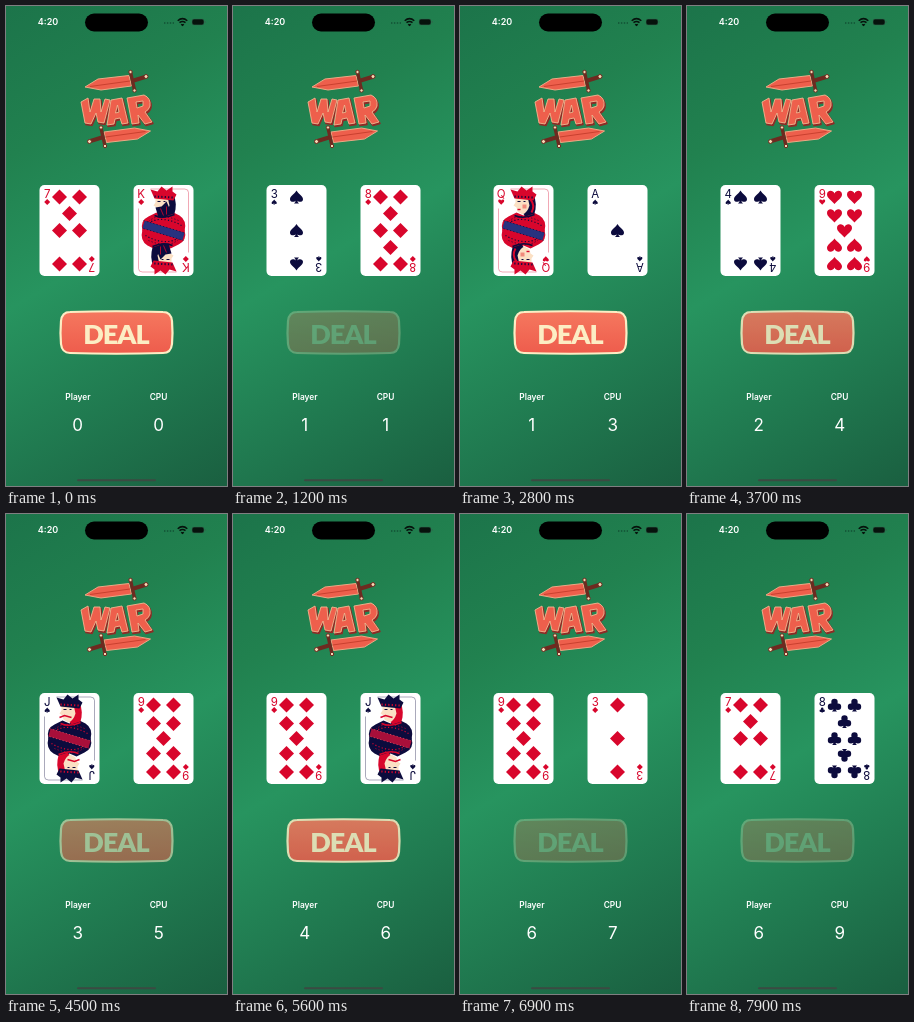
Recreate the animation shown at these times as an HTML page. Size 221 px wide and 480 px high, loop 8000 ms.

```html
<!DOCTYPE html>
<html lang="en">
<head>
<meta charset="utf-8">
<title>Card game</title>
<style>
  html, body { margin: 0; width: 100%; height: 100%; overflow: hidden; background: #1f7a50; }
  svg { display: block; width: 100%; height: 100%; }
  text { text-anchor: middle; font-family: Inter, sans-serif; fill: #fff; }
  .label { font-size: 8.4px; font-weight: 600; }
  .score { font-size: 17px; }
  .rank { font: 11.5px Inter, sans-serif; }
  .deal { font: 900 27px Lato, sans-serif; letter-spacing: -1px; fill: #fcedc4; }
</style>
</head>
<body>
<svg viewBox="0 0 221 480">
  <defs>
    <linearGradient id="felt" gradientUnits="userSpaceOnUse" x1="0" y1="0" x2="267" y2="453">
      <stop offset="0" stop-color="#1c744a"/>
      <stop offset=".25" stop-color="#21814f"/>
      <stop offset=".5" stop-color="#27945f"/>
      <stop offset=".75" stop-color="#207a50"/>
      <stop offset="1" stop-color="#1a5f40"/>
    </linearGradient>
    <linearGradient id="coral" x2="0" y2="1">
      <stop offset="0" stop-color="#f5785f"/>
      <stop offset="1" stop-color="#ee5c4c"/>
    </linearGradient>
    <g id="sword" stroke-linejoin="round">
      <path d="M79 81L92 73 123 69.500 125.500 80 95 84z" fill="#ee5f4c" stroke="#eba985"/>
      <path d="M84 80.500L124 75" stroke="#c9402f"/>
      <path d="M126 75L139 71" stroke="#6d2a20" stroke-width="4"/>
      <path d="M124.500 66L128.500 84" stroke="#6d2a20" stroke-width="3.400" stroke-linecap="round"/>
      <g fill="#f6d9b4" stroke="#6d2a20">
        <circle cx="124.500" cy="66" r="1.700"/>
        <circle cx="128.500" cy="84.500" r="1.700"/>
        <circle cx="140" cy="70.500" r="2"/>
      </g>
    </g>
    <path id="lettering" fill-rule="evenodd" stroke-linejoin="round" d="
      M75 96L82 92 84 106 88 93 94 93 95 106 99 93 104 94 98 117 92 116 90 107 85 118 79 117z
      M105 94L116 92 122 117 116 118 114 112 109 113 108 118 101 119z M109.500 107L113 106 111.500 99z
      M121 92L138 89Q145 92 144 100Q143 104 139 106L146 116 139 118 132 109 133 117 126 118z M130 96L137 95 137 100 131 102z"/>
  </defs>

  <rect width="221" height="480" fill="url(#felt)"/>

  <!-- Status bar -->
  <text x="42" y="19.300" font-size="9" font-weight="600">4:20</text>
  <rect x="79" y="7.500" width="63" height="18" rx="9"/>
  <path d="M158 17H168" stroke="#125034" stroke-width="1.400" stroke-dasharray="1.400 1.500"/>
  <g fill="none" stroke="#06120c" stroke-width="1.500">
    <path d="M171.700 14.700Q176.500 10.600 181.300 14.700M173.500 16.700Q176.500 14.200 179.500 16.700"/>
    <path d="M175.200 18.200L176.500 19.300 177.800 18.200"/>
  </g>
  <rect x="186" y="13" width="12" height="6" rx="2" fill="#06120c" stroke="#2f6b4e" stroke-width=".6"/>
  <path d="M199.300 15V17" stroke="#2f6b4e"/>

  <!-- Title -->
  <use href="#sword"/>
  <use href="#sword" transform="rotate(180 111.750 103)"/>
  <g role="img" aria-label="WAR">
    <use href="#lettering" x="1" y="1.500" fill="#8e2b26" stroke="#8e2b26" stroke-width="1.500"/>
    <use href="#lettering" fill="#ee5f4c" stroke="#f0b891" stroke-width=".9"/>
  </g>

  <g id="cards"></g>

  <g id="button">
    <path d="M64 306Q110 304.500 157 306Q165 306 166 315Q167 327 166 338Q165 347 157 347Q110 348.500 64 347Q56 347 55 338Q54 327 55 315Q56 306 64 306z"
      fill="url(#coral)" stroke="#fcedc4" stroke-width="2.200"/>
    <text class="deal" x="110" y="337.500">DEAL</text>
  </g>

  <text class="label" x="72" y="393.800">Player</text>
  <text class="label" x="152.500" y="393.800">CPU</text>
  <text class="score" id="player" x="71.700" y="425"></text>
  <text class="score" id="cpu" x="152.700" y="425"></text>
  <rect x="71" y="473.300" width="79" height="2" rx="1" fill="#3b4a42"/>
</svg>

<script>
const LOOP = 8000, STEP = 100;
const RED = '#d8062c', NAVY = '#0c0b3d', SKIN = '#fbe0c4';
const ORDER = '23456789TJQKA';

// Time of each deal in ms, then the player's and the CPU's card.
const deals = [
  [0, '7D', 'KD'], [500, '9C', '4H'], [1200, '3S', '8D'], [1800, '5S', 'TH'],
  [2400, 'QH', 'AS'], [2900, '6C', '2D'], [3400, '4S', '9H'], [3900, '3H', '6S'],
  [4300, 'JS', '9D'], [4800, 'TC', '5D'], [5300, '9D', 'JS'], [5800, '8H', '4C'],
  [6300, '2S', '7H'], [6800, '9D', '3D'], [7300, '5H', 'TS'], [7800, '7D', '8C']
];

const suits = {
  D: 'M0-7.500L7.500 0 0 7.500-7.500 0z',
  H: 'M0 7C-3 3-7.5 1-7.5-2.6C-7.500-7-1.500-7.500 0-3.500C1.500-7.500 7.500-7 7.500-2.600C7.500 1 3 3 0 7z',
  S: 'M0-6.500C2-3 6.500-1 6.500 2.200C6.500 5.400 2 5.600.8 3.400Q1 5.500 2.500 6.500H-2.500Q-1 5.500-.8 3.400C-2 5.600-6.500 5.400-6.500 2.200C-6.500-1-2-3 0-6.500z',
  C: 'M-3.200-3a3.200 3.200 0 1 1 6.400 0a3.200 3.200 0 1 1-6.400 0M-6.700 1.700a3.200 3.200 0 1 1 6.400 0a3.200 3.200 0 1 1-6.400 0M.3 1.700a3.200 3.200 0 1 1 6.400 0a3.200 3.200 0 1 1-6.400 0M-1.500-1.500H1.500L.8 3Q1 5.500 2.500 6.500H-2.500Q-1 5.500-.8 3z'
};

const path = (d, fill, extra = '') => `<path d="${d}" fill="${fill}" ${extra}/>`;
const line = (d, color, width, extra = '') =>
  path(d, 'none', `stroke="${color}" stroke-width="${width}" ${extra}`);
const bothWays = art => art + `<g transform="rotate(180)">${art}</g>`;

function pips(rank, suit, color) {
  const n = rank === 'A' ? 1 : ORDER.indexOf(rank) + 2;
  const spots = [];
  const pairs = (...rows) => rows.forEach(y => spots.push([-10, y], [10, y]));
  const singles = (...rows) => rows.forEach(y => spots.push([0, y]));
  if (n === 2 || n === 3) singles(-33.5, 33.5);
  if (n > 3) pairs(-33.5, 33.5);
  if (n > 5 && n < 9) pairs(0);
  if (n === 7 || n === 8) singles(-17);
  if (n === 8) singles(17);
  if (n === 9) pairs(-15, 15);
  if (n === 10) { pairs(-9, 9); singles(-21.5, 21.5); }
  if (n % 2 && n !== 7) singles(0);
  return spots.map(([x, y]) =>
    path(suits[suit], color, `transform="translate(${x} ${y}) rotate(${y > 0 ? 180 : 0})"`)).join('');
}

// Half a figure in profile, repeated upside down, with a sash across the middle.
function court(rank, color) {
  const jack = rank === 'J';
  const robe = jack ? NAVY : RED;
  const accent = jack ? RED : NAVY;
  const sash = jack ? '#a80f3a' : '#28327f';
  const dots = 'stroke-dasharray="1.2 2.2"';
  const half = line('M-25-22V38Q-25 41.500-21 41.500H13', color, .5, 'opacity=".7"')
    + path('M-21 1Q-24-10-15-14L-7-18 0-15 8-19 16-15Q24-10 21 1z', robe)
    + line('M-18-5Q-10-12 0-11T18-5', accent, 1.2, dots)
    + line('M-15-9Q-8-15 0-14T15-10', accent, .8, dots)
    + path('M0-36H10Q14-27 11-17L2-14-3-20z', accent)
    + path('M-8-34H4L6-25Q4-18-1-16L-6-19-7-23-10-25-8-28z', SKIN)
    + path('M-9-32L-13-41-6-39-2-44 3-40 9-44 9-39 13-36 10-30z', robe)
    + line('M-9-34L10-33', accent, 2, dots)
    + line('M-9-15Q0-11 11-16', accent, 1.6)
    + line('M-6-29H-3M0-29H2', NAVY, 1)
    + (rank === 'K' ? path('M-8-23L-2-24 3-29 7-20 2-13-5-13z', NAVY) + line('M-3-22L0-15M3-24V-16', RED, .8) : '')
    + (jack ? line('M-10-21L-5-23 2-21', RED, 1.6) : '')
    + (rank === 'Q' ? line('M-6-21H-3', RED, 1.4) + path('M-1-26h4v4h-4z', '#f08a7c')
      + line('M7-31Q12-25 8-18', RED, 2) : '');
  return bothWays(half)
    + line('M-20-6L20 6', sash, 8)
    + line('M-20-10L20 2M-20-2L20 10', jack ? '#e05064' : NAVY, .8, dots);
}

function card(x, [rank, suit]) {
  const color = 'DH'.includes(suit) ? RED : NAVY;
  const label = rank === 'T' ? '10' : rank;
  const corner = `<text class="rank" x="-22.300" y="-32.300" style="fill:${color}"`
    + `${label === '10' ? ' letter-spacing="-1"' : ''}>${label}</text>`
    + path(suits[suit], color, 'transform="translate(-22.300 -28.500) scale(.4)"');
  return `<g transform="translate(${x} 224.500)">
    <rect x="-30" y="-45.500" width="60" height="91" rx="5" fill="#fff"/>
    ${'JQK'.includes(rank) ? court(rank, color) : pips(rank, suit, color)}${bothWays(corner)}</g>`;
}

// The button dims on a tap, then fades back in.
function buttonOpacity(age) {
  const back = Math.min(1, Math.max(0, (age - 100) / 250));
  return 0.28 + 0.72 * back;
}

const byId = id => document.getElementById(id);
let shownDeal = -1;

function showDeal(index) {
  const [, left, right] = deals[index];
  byId('cards').innerHTML = card(63.5, left) + card(157.5, right);
  const leads = deals.slice(1, index + 1)
    .map(([, a, b]) => ORDER.indexOf(a[0]) - ORDER.indexOf(b[0]));
  byId('player').textContent = leads.filter(d => d > 0).length;
  byId('cpu').textContent = leads.filter(d => d < 0).length;
  shownDeal = index;
}

function draw() {
  const time = Math.floor(performance.now() % LOOP / STEP) * STEP;
  const index = deals.filter(([start]) => start <= time).length - 1;
  if (index !== shownDeal) showDeal(index);
  byId('button').setAttribute('opacity', index < 2 ? 1 : buttonOpacity(time - deals[index][0]));
  requestAnimationFrame(draw);
}
draw();
</script>
</body>
</html>
```
